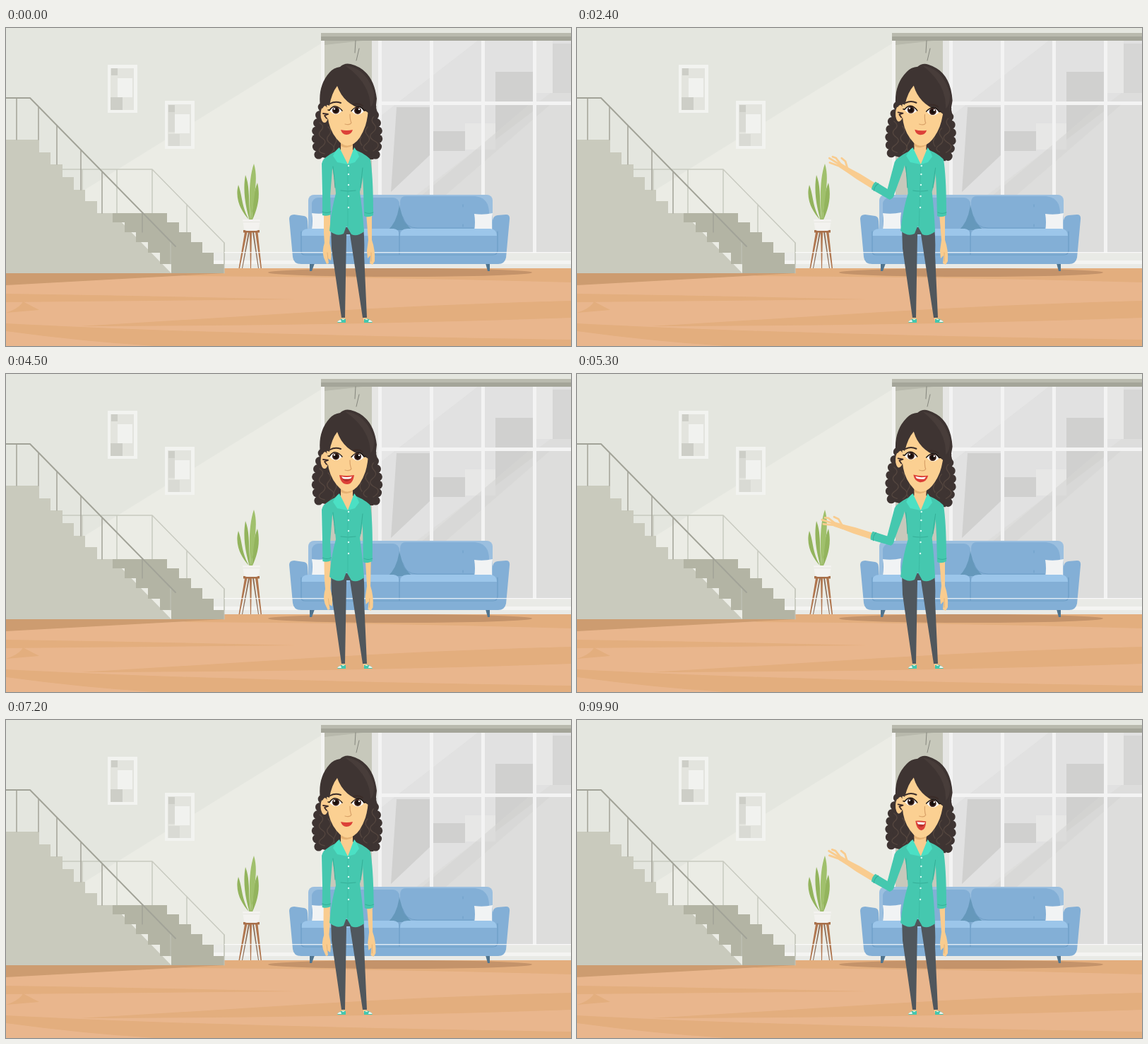
Write an HTML page that moves like this. It is 800 px wide and 450 px high and loops after 10 s.

```html
<!DOCTYPE html>
<html lang="en">
<head>
<meta charset="utf-8">
<title>Living room</title>
<style>
html, body { margin: 0; width: 100%; height: 100%; overflow: hidden; background: #e4e6df; }
svg { display: block; width: 800px; height: 450px; }
.line { fill: none; stroke-linecap: round; stroke-linejoin: round; }
</style>
</head>
<body>
<svg viewBox="0 0 800 450">
  <!-- wall -->
  <path fill="#e4e6df" d="M0 0H800V345H0Z"/>
  <path fill="#ebece5" d="M446 22L0 298V347H800V22Z"/>

  <!-- pictures -->
  <g id="frame">
    <path fill="#f2f3f0" d="M144 52h42v68h-42z"/>
    <path fill="#e3e4de" d="M148 57h33v59h-33z"/>
    <path fill="#f1f2ef" d="M158 71h21v27h-21z"/>
  </g>
  <use href="#frame" x="81" y="51"/>
  <path fill="#cdcec7" d="M149 57h9v10h-9zM148 98h17v18h-17zM230 109h9v10h-9z"/>
  <path fill="#d9dad4" d="M230 119h9v28h-9zM230 150h16v17h-16z"/>

  <!-- window -->
  <path fill="#c7c8bb" d="M451 18H518V330H451Z"/>
  <path fill="#b8b9ac" d="M451 18H505L451 24Z"/>
  <path fill="#f3f3f1" d="M446 18h5v312h-5z"/>
  <path fill="#dddddc" d="M518 18H800V330H518Z"/>
  <path fill="#e6e6e6" d="M530 18H668L530 125Z"/>
  <path fill="#e1e1e1" d="M668 18H800V70L580 237H530V125Z"/>
  <path fill="#d0d0cf" d="M693 62h53v56l-53 40zM553 112h47v68l-55 52zM605 146h45v28h-45z"/>
  <path fill="#d6d6d5" d="M774 22h26v70h-26z"/>
  <path fill="#e7e7e6" d="M650 135h43v37h-43zM751 18h23v74h-23z"/>
  <path fill="#d5d5d4" d="M740 109L770 109L622 237H588Z" opacity=".6"/>
  <path fill="#e6e6e4" d="M518 18h9v219h-9z"/>
  <path fill="#f3f3f3" d="M527 18h5v312h-5zM600 18h5v312h-5zM673 18h5v312h-5zM746 18h5v312h-5zM530 104H800v5H530z"/>
  <path fill="#b9baae" d="M446 7H800v5H446z"/>
  <path fill="#a4a599" d="M446 12H800v6H446z"/>
  <path class="line" stroke="#85867d" d="M495 18L494 35M500 29L496 46"/>

  <!-- skirting -->
  <path fill="#e9eae6" d="M294 318H800V340H294Z"/>
  <path fill="#f4f4f2" d="M294 329H800v5H294z"/>

  <!-- floor -->
  <path fill="#e9b68d" d="M0 347H309V340H800V450H0Z"/>
  <g fill="#e3ae7e">
    <path d="M309 340H800V360Q520 352 250 351Z"/>
    <path d="M0 376Q210 379 412 384L0 388Z"/>
    <path d="M24 387L47 399L0 403Q20 396 24 387Z"/>
    <path d="M800 386Q590 392 430 402T105 422Q500 421 800 410Z"/>
    <path d="M0 418Q280 433 800 441V450H210Q110 444 0 429Z"/>
  </g>
  <path fill="#cd9c70" d="M0 347H309L0 364Z"/>

  <!-- stairs -->
  <g class="line" stroke="#c8cac0" stroke-width="1.5">
    <path d="M80 200H207L309 304V334M108 200V229M157 200V262M207 200V262M256 250V290"/>
  </g>
  <path fill="#c9cabd" d="M0 158H47V176H63V193H80V211H96V229H112V245H129V262H151L234 347H0Z"/>
  <path fill="#b3b4a4" d="M151 262h77v13h-77zM168 275h77v14h-77zM184 289h78v14h-78zM201 303h77v15h-77zM218 318h76v16h-76zM234 334h75v13h-75z"/>
  <path class="line" stroke="#c2c4b9" d="M233 303V334M309 304V347"/>
  <g class="line" stroke="#a2a398">
    <path stroke-width="2" d="M0 99H34L240 309"/>
    <path stroke-width="1.5" d="M15 99V158M46 112V158M72 138V193M106 173V229M136 204V262M193 262V289"/>
  </g>

  <!-- plant -->
  <path fill="#8d6e58" d="M343 289H345L335 340H334ZM349 289H351L358 340H357Z"/>
  <path fill="#b0764f" d="M338 289H341.500L331 340H329.500ZM345 289H348L347 340H346ZM353 289H356.500L362 340H360.500Z"/>
  <path fill="#a86f49" d="M336 286H359V289.500H336Z"/>
  <g fill="#93b45d">
    <path d="M344 271C335 262 323 243 329 222C335 238 333 252 344 271Z"/>
    <path d="M344.500 271C337 245 336 225 339 208C346 225 343 248 346 271Z"/>
    <path d="M348 271C350 250 349 236 356 219C361 240 355 258 349 271Z"/>
  </g>
  <path fill="#a0c06c" d="M346 271C344 240 344 212 351 192C358 214 350 240 348 271Z"/>
  <path fill="#f3f2ef" d="M335 271H360L358 284Q357 287 354 287H341Q338 287 337 284Z"/>
  <path fill="#e6e6e1" d="M335.500 274H359.500V275H335.500Z"/>

  <!-- sofa -->
  <ellipse cx="558" cy="346" rx="187" ry="6" fill="#c4936a"/>
  <path fill="#50758f" d="M430 333H437L433 344H430ZM679 333H685V344H682Z"/>
  <rect x="428" y="236" width="261" height="66" rx="8" fill="#9bbfdf"/>
  <rect x="433" y="240" width="124" height="62" rx="9" fill="#83afd6"/>
  <path fill="#83afd6" d="M558 247Q558 238 566 238H664Q684 240 684 262V300H558Z"/>
  <path fill="#6598bb" d="M557 250Q561 274 575 286H541Q554 274 557 250Z"/>
  <path class="line" stroke="#6f9fc8" d="M562 268Q566 283 582 283H662M647 250v3M647 278v3"/>
  <g fill="#f1f3f4">
    <path d="M433 262Q446 264 459 261Q457 273 459 285Q446 283 433 285Q435 273 433 262Z"/>
    <path d="M663 263Q676 265 689 262Q687 275 689 287Q676 285 663 287Q665 275 663 263Z"/>
  </g>
  <path fill="#83afd6" d="M401 270Q401 264 408 264L422 266Q427 267 427 273L428 290H688L689 272Q690 266 696 265L708 264Q714 264 713 271L708 325Q706 334 697 334H418Q407 334 406 324Z"/>
  <path fill="#9cc6ea" d="M418 294Q418 284 428 284H549Q557 285 557 294ZM558 294Q558 284 568 284H686Q695 285 695 294Z"/>
  <path class="line" stroke="#6c9dc6" stroke-width="1.2" d="M418 288V316Q418 321 423 321H690Q696 321 696 314V288M557 286V321"/>
  <path fill="#fff" opacity=".8" d="M309 317H800v1.300H309z"/>

  <!-- woman -->
  <path fill="#f9cc8f" d="M475 408h5v6h-5zM506 408h5v6h-5z"/>
  <g id="shoe">
    <path fill="#43c7ae" d="M469 416Q474 410 481 412L481 417H470Z"/>
    <path fill="#f4f4f0" d="M469 416Q471 413 474 413L475 416ZM476 412h3v1h-3z"/>
  </g>
  <use href="#shoe" transform="matrix(-1 0 0 1 988 0)"/>
  <path fill="#50575d" d="M460 282H506Q508 300 507 320L511 410H505L487 292H482L480 410H475L461 312Z"/>

  <g id="headBack">
    <path id="backHair" fill="#3e3432" d="M450 90H518L526 120V176L520 186H500L470 180L462 186L443 182L441 140Z"/>
    <g id="curls" fill="#3e3432"></g>
    <g class="line" stroke="#54463f" stroke-width="1.300">
      <path d="M444 134q8 5 2 11t2 11t-1 12t4 10M456 140q7 6 1 12t3 12t-1 14M466 152q4 6 0 12t1 12"/>
      <path d="M522 124q-7 6-1 12t-2 12t3 12t-2 14M512 140q-6 6 0 12t-2 12t1 10M503 154q-4 6 1 12"/>
    </g>
  </g>

  <g id="farArm">
    <path fill="#f9cc8f" d="M510 262H518L518 300Q523 314 522 330L519 335L515 333L516 322L512 326L511 315L513 300Z"/>
    <path class="line" stroke="#e0ad70" stroke-width=".8" d="M517 318V330"/>
    <path fill="#45c8af" d="M504 186Q511 180 516 186Q520 210 520 265Q513 269 507 266L506 230Z"/>
    <path class="line" stroke="#35ae97" d="M508 261Q514 264 520 261"/>
  </g>

  <g id="body">
    <path fill="#f9cc8f" d="M474 155H491V172L497 178L484 194L468 178L474 172Z"/>
    <path fill="#e5b173" d="M474 161Q483 172 491 161V166Q483 172 474 167Z"/>
    <g id="arm">
      <g id="fore">
        <path fill="#f9cc8f" d="M450 258H459L459 290L457.500 314H451.500L450 290Z"/>
        <g id="handDown">
          <path fill="#f9cc8f" d="M451 304Q447 315 450 325L454 334L457 333L456 326L460 329Q462 318 458 304Z"/>
          <path class="line" stroke="#e0ad70" stroke-width=".8" d="M455 318L456 327"/>
        </g>
        <g id="handOpen" class="line" stroke="#f9cc8f" stroke-width="3.6" transform="translate(0 4)">
          <path stroke-width="6.500" d="M454.500 304V315"/>
          <path stroke-width="2.800" d="M453 305L446 313L445 320M453 316L449 327L450 332M454 316L454 335M456 316L459 331"/>
        </g>
        <path fill="#45c8af" d="M448 234Q453 229 459 234L460 264Q454 267 448 265Z"/>
        <path class="line" stroke="#35ae97" d="M448 260Q454 263 460 260"/>
      </g>
      <path fill="#45c8af" d="M447 192Q449 182 458 183Q463 186 462 200L459 238Q453 244 448 237Z"/>
    </g>
    <path fill="#45c8af" d="M450 186Q456 179 470 173L484 193L496 173Q508 178 515 185Q507 192 506 200Q505 218 501 232Q505 260 507 288Q497 296 489 292L482 280L478 291Q469 296 458 287Q460 260 467 234Q465 208 461 194Z"/>
    <path class="line" stroke="#35ae97" d="M474 230Q484 232 495 230M463 196Q465 212 466 226M505 198Q503 214 502 226"/>
    <path class="line" stroke="#3bb9a1" stroke-width=".8" d="M484 194V280"/>
    <path fill="#4be0c4" d="M472 169L484 193L469 190L463 181Q467 172 472 169ZM493 169L484 193L494 190L500 182Q497 173 493 169Z"/>
    <g fill="#d9fff6">
      <circle cx="485" cy="195" r="1.200"/><circle cx="485" cy="207" r="1.200"/><circle cx="485" cy="222" r="1.200"/><circle cx="485" cy="238" r="1.200"/><circle cx="485" cy="254" r="1.200"/>
    </g>
  </g>

  <g id="head">
    <ellipse cx="451" cy="122" rx="5.500" ry="12" fill="#f9cc8f"/>
    <path fill="#fbd092" d="M456 90L468 76L512 95Q515 118 509 138Q502 158 492 164Q483 169 474 163Q461 151 457 134Q452 112 456 90Z"/>
    <path class="line" stroke="#3a2a28" stroke-width="1.800" d="M449 121L456 122L451 124L454 128"/>
    <path fill="#3e3432" d="M445 112Q441 82 458 63Q464 56 473 55Q479 49 488 51Q520 59 525 100L522 126Q513 120 507 116Q478 108 469 82Q461 92 458 110Q452 107 448 114Z"/>
    <path fill="#483d3a" d="M480 53Q510 56 521 92Q522 107 516 112Q516 78 480 53Z"/>

    <path class="line" stroke="#3a2c28" stroke-width="2" d="M459 107Q466 103 474 106M492 108Q500 106 505 110"/>
    <g id="eye">
      <path fill="#fff" d="M458 117Q466 105 476 117Q467 127 458 117Z"/>
      <circle cx="467" cy="116.500" r="5" fill="#3b211b"/>
      <circle cx="467" cy="116.500" r="3" fill="#170e0c"/>
      <circle cx="465" cy="114.500" r="1.200" fill="#fff"/>
      <path class="line" stroke="#1d1512" stroke-width="1.500" d="M456 116L458 116.500Q466 105 476 117"/>
    </g>
    <use href="#eye" transform="matrix(-1 0 0 1 965 .5)"/>
    <path class="line" stroke="#d9a269" stroke-width="1.200" d="M487 122Q487 130 489 134Q487 138 480 136"/>

    <g class="mouth" data-shape="A">
      <path fill="#dc4038" d="M474 144Q482 146 491 144Q489 151 482 151Q476 151 474 144Z"/>
    </g>
    <g class="mouth" data-shape="B">
      <path fill="#dc4038" d="M472 143Q482 145 493 143Q491 153 482 153Q474 152 472 143Z"/>
      <path fill="#fff" d="M475 145Q482 147 490 145L488 148Q482 149 477 148Z"/>
    </g>
    <g class="mouth" data-shape="C">
      <path fill="#dc4038" d="M472 143Q482 145 493 143Q491 156 483 156Q474 156 472 143Z"/>
      <path fill="#b5302c" d="M475 145Q482 147 490 145Q488 152 482 152Q477 152 475 145Z"/>
      <path fill="#fff" d="M475 145Q482 147 490 145L488 148Q482 149 477 148Z"/>
    </g>
    <g class="mouth" data-shape="D">
      <path fill="#dc4038" d="M475 143Q482 142 490 143Q490 155 484 156Q477 155 475 143Z"/>
      <path fill="#b5302c" d="M478 146H488Q487 151 483 151Q479 151 478 146Z"/>
      <path fill="#fff" d="M477 144.500H489L487 147.500H479Z"/>
    </g>
  </g>
</svg>
<script>
const LOOP = 10000, STEP = 100;
const gestureStarts = [600, 4950, 9300];
const mouthCycle = "ACBDCBADCBCADBCDBCADBCAD";
const lean = [[0, 0], [300, 1], [1900, 1], [2200, 0]];
const bend = [[0, 0], [250, 78], [350, 93], [600, 106], [700, 104], [1100, 106], [1650, 110], [1900, 105], [2200, 0]];
const $ = id => document.getElementById(id);
const mouths = document.querySelectorAll(".mouth");

// Scalloped edges of the curly hair
function addCurls(side) {
  for (let i = 0; i < 7; i++) {
    const c = document.createElementNS("http://www.w3.org/2000/svg", "circle");
    const bulge = 9 * Math.sin(i / 6 * Math.PI * 0.8);
    c.setAttribute("cx", side < 0 ? 448 - bulge : 518 + bulge);
    c.setAttribute("cy", 112 + i * 11.2);
    c.setAttribute("r", 6.3);
    $("curls").append(c);
  }
}
addCurls(-1);
addCurls(1);

function track(keys, t) {
  if (t <= keys[0][0]) return keys[0][1];
  for (let i = 1; i < keys.length; i++) {
    const [t0, a] = keys[i - 1], [t1, b] = keys[i];
    if (t <= t1) {
      const p = (t - t0) / (t1 - t0);
      return a + (b - a) * p * p * (3 - 2 * p);
    }
  }
  return keys[keys.length - 1][1];
}

const setTransform = (id, value) => $(id).setAttribute("transform", value);

function draw(now) {
  const t = Math.floor(now % LOOP / STEP) * STEP;
  const start = gestureStarts.filter(s => s <= t).pop() ?? LOOP;
  const u = track(lean, t - start);
  const sway = Math.sin(t / LOOP * Math.PI * 10) * (1 - u);
  const tilt = `translate(${3 * u} 0) rotate(${3.3 * u} 480 165)`;

  setTransform("body", `translate(0 290) skewX(${-1.64 * u}) translate(0 -290)`);
  setTransform("headBack", tilt);
  setTransform("head", tilt);
  setTransform("arm", `rotate(${14.5 * u} 456 190)`);
  setTransform("fore", `rotate(${track(bend, t - start) - sway} 453 238)`);
  setTransform("farArm", `translate(${3 * u} 0) rotate(${sway} 513 190)`);
  $("handOpen").style.display = u > 0.5 ? "" : "none";
  $("handDown").style.display = u > 0.5 ? "none" : "";

  const shape = mouthCycle[t / STEP % mouthCycle.length];
  mouths.forEach(m => m.style.display = m.dataset.shape === shape ? "" : "none");
}

const begin = performance.now();
function tick() {
  draw(performance.now() - begin);
  requestAnimationFrame(tick);
}
tick();
</script>
</body>
</html>
```
